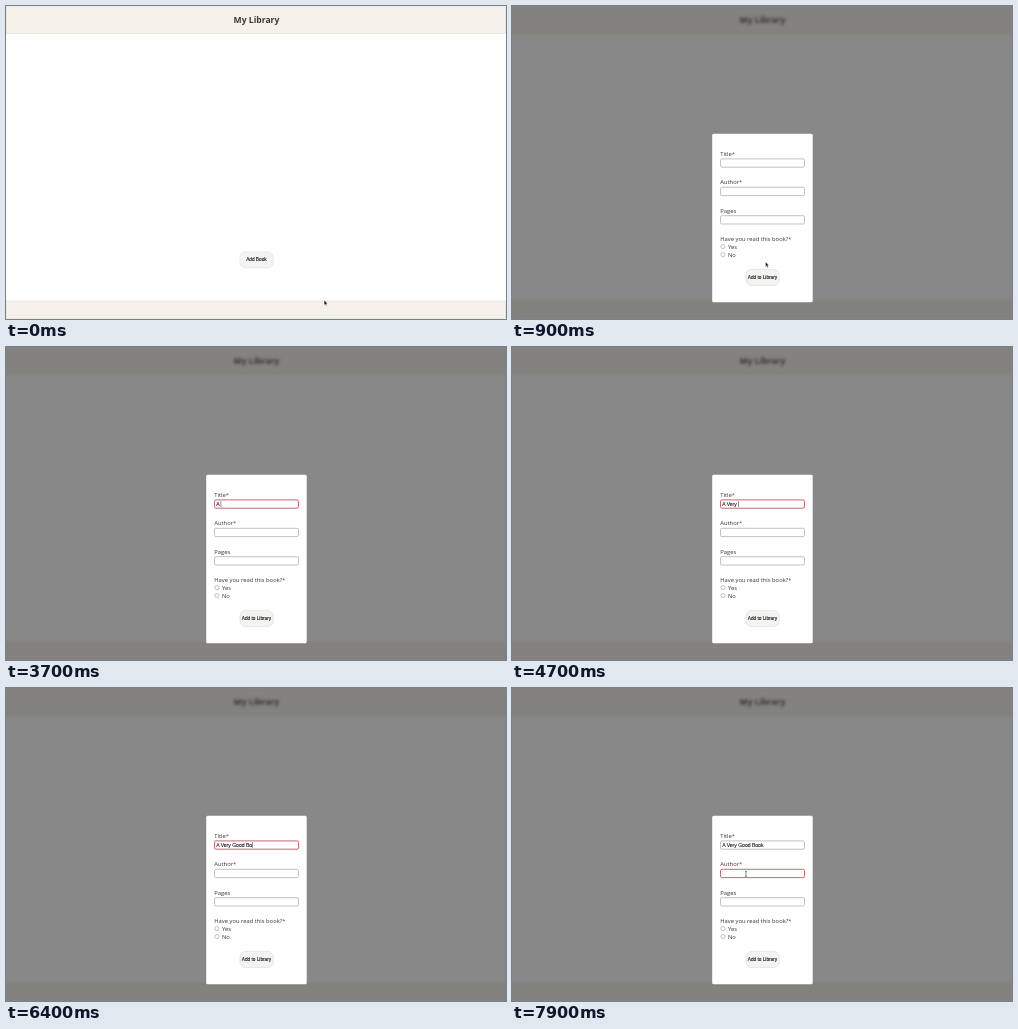
An HTML page for the animation above (8000 ms loop, 500x313 px).

```html
<!DOCTYPE html>
<html lang="en">
<head>
<meta charset="utf-8">
<title>My Library</title>
<style>
html, body { margin: 0; width: 100%; height: 100%; overflow: hidden; background: #fff; }
svg { display: block; width: 100%; height: 100%; }
text { white-space: pre; }
.heading { font: 700 8.6px "Open Sans", sans-serif; fill: #3d3a38; text-anchor: middle; }
.label { font: 5.8px "Open Sans", sans-serif; fill: #333; }
.star { fill: #8c3a40; }
.button { font: 4.74px "Liberation Sans", Arial, sans-serif; fill: #111; stroke: #111; stroke-width: .1px; text-anchor: middle; }
.value { font: 5.06px "Liberation Sans", Arial, sans-serif; fill: #111; stroke: #111; stroke-width: .08px; }
.bar { fill: #f5f2ec; stroke: #dfdcd5; stroke-width: .6px; }
.field { fill: #fff; stroke: #aaa; stroke-width: .7px; }
.field.focus { stroke: #c25862; stroke-width: .9px; }
</style>
</head>
<body>
<svg viewBox="0 0 500 313" preserveAspectRatio="none">
  <defs><filter id="blur" x="-5%" y="-5%" width="110%" height="110%"><feGaussianBlur stdDeviation="1.4"/></filter></defs>
  <rect width="500" height="313" fill="#fff"/>
  <g id="page">
    <rect class="bar" x=".3" y=".8" width="499.4" height="26.9"/>
    <rect class="bar" x=".3" y="295.1" width="499.4" height="17.2"/>
    <text class="heading" x="250.5" y="17.4">My Library</text>
    <rect id="add" x="233.8" y="245.7" width="33.4" height="16.2" rx="5.5" stroke="#dedede" stroke-width=".5"/>
    <text class="button" x="250.4" y="255.4">Add Book</text>
  </g>
  <g id="modal">
    <rect width="500" height="313" fill-opacity=".467"/>
    <rect x="200.2" y="127.8" width="100.5" height="168.4" rx="1.5" fill="#fff"/>
    <g id="form"></g>
    <rect x="234" y="263.4" width="33.2" height="16" rx="5.5" fill="#f3f3f1" stroke="#d9d9d7" stroke-width=".6"/>
    <text class="button" x="250.5" y="273.1">Add to Library</text>
    <text id="value" class="value" x="210.2" y="158.8"></text>
    <rect id="caret" width=".5" height="5.6" fill="#222"/>
  </g>
  <g id="pointer">
    <path id="arrow" d="M0 0V4.7L1.1 3.8L1.9 5.6L2.7 5.2L1.9 3.5H3.3Z" fill="#111" stroke="#fff" stroke-width=".3"/>
    <path id="hand" d="M-1.2 -3.2Q-.5 -3.9 -.1 -3L.2 -1.2L1.9 -.8Q2.8 -.4 2.6 .8L2 3H-1L-2.7 .6Q-2.7 -.4 -1.5 .3Z" fill="#fff" stroke="#333" stroke-width=".6"/>
    <path id="beam" d="M-1.1 -2.7Q0 -2.7 0 -2Q0 -2.7 1.1 -2.7M0 -2V2M-1.1 2.7Q0 2.7 0 2Q0 2.7 1.1 2.7" fill="none" stroke="#333" stroke-width=".6"/>
  </g>
</svg>
<script>
const LOOP = 8000, OPEN = 900, TITLE_FOCUS = 1700, AUTHOR_FOCUS = 7400;
const TEXT = "A Very Good Book";
const $ = id => document.getElementById(id);

const label = (x, y, text, star = "") =>
  `<text class="label" x="${x}" y="${y}">${text}<tspan class="star">${star}</tspan></text>`;
const field = (id, y) =>
  `<rect id="${id}" class="field" x="208.5" y="${y}" width="84" height="8.3" rx="1.4"/>`;
const radio = (y, text) =>
  `<circle cx="210.9" cy="${y}" r="2.1" fill="#fff" stroke="#888" stroke-width=".5"/>` + label(216, y + 2.2, text);

$("form").innerHTML =
  label(208.3, 150.2, "Title", "*") + field("title", 152.9) +
  label(208.3, 178.4, "Author", "*") + field("author", 181.3) +
  label(208.3, 206.7, "Pages") + field("pages", 209.7) +
  label(208.3, 235, "Have you read this book?", "*") +
  radio(240.6, "Yes") + radio(248.6, "No");

// time, x, y, shape
const pointerSteps = [
  [0, 318.2, 294.2, "arrow"], [100, 302, 284, "arrow"], [160, 276, 270, "arrow"], [220, 260.4, 262, "arrow"],
  [400, 257, 260, "hand"], [490, 250, 256, "hand"], [580, 248, 256, "hand"], [670, 254, 258.6, "hand"],
  [900, 253.6, 256, "arrow"], [1240, 245.3, 201.5, "arrow"],
  [1390, 245, 186, "beam"], [1490, 244.5, 170, "arrow"], [1590, 244.4, 156.8, "beam"], [3200, 0, 0, ""],
  [6900, 244, 157, "beam"], [7000, 243, 164, "arrow"], [7100, 239, 173, "arrow"],
  [7200, 236, 182, "beam"], [7300, 234, 185.8, "beam"]
];
const keyTimes = [3200, 3700, 4000, 4300, 4400, 4500, 4700, 5000, 5300, 5500, 5600, 5700, 6000, 6400, 6500, 6600];

const show = (el, on) => el.setAttribute("visibility", on ? "visible" : "hidden");

function render(t) {
  const open = t >= OPEN;
  const inTitle = t >= TITLE_FOCUS && t < AUTHOR_FOCUS;
  const inAuthor = t >= AUTHOR_FOCUS;

  show($("modal"), open);
  if (open) $("page").setAttribute("filter", "url(#blur)");
  else $("page").removeAttribute("filter");
  $("add").setAttribute("fill", t >= 400 && !open ? "#dadada" : "#f3f3f3");
  $("title").classList.toggle("focus", inTitle);
  $("author").classList.toggle("focus", inAuthor);

  const count = keyTimes.filter(k => t >= k).length;
  $("value").textContent = TEXT.slice(0, count);
  const typed = inTitle && count ? $("value").getComputedTextLength() : 0;
  const caretOn = (inTitle && !(t >= 2300 && t < 2900)) || (inAuthor && t < 7900);
  $("caret").setAttribute("x", 210.2 + typed);
  $("caret").setAttribute("y", inAuthor ? 182.6 : 154.2);
  show($("caret"), caretOn);

  const [, x, y, shape] = pointerSteps.filter(s => t >= s[0]).pop();
  $("pointer").setAttribute("transform", `translate(${x} ${y})`);
  for (const id of ["arrow", "hand", "beam"]) show($(id), id === shape);
}

const start = performance.now();
function tick() {
  render((performance.now() - start) % LOOP);
  requestAnimationFrame(tick);
}
tick();
</script>
</body>
</html>
```
